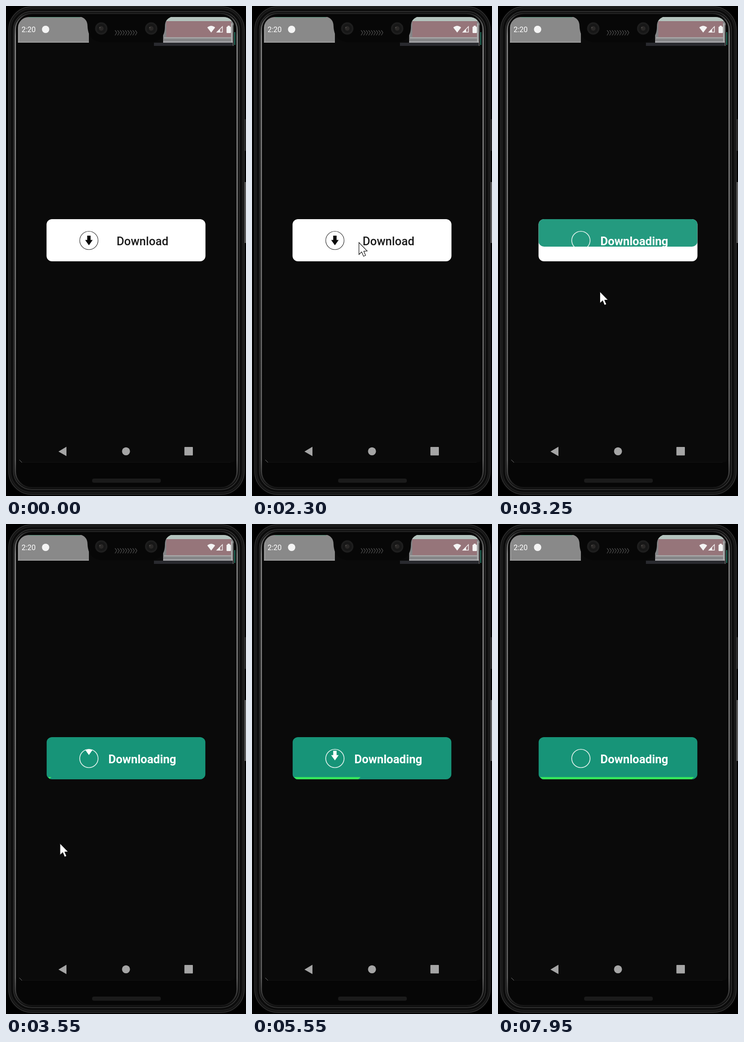
Write an HTML page with a canvas that moves like this. It is 524x1069 px and loops after 8000 ms.

```html
<!DOCTYPE html>
<html lang="en">
<head>
<meta charset="utf-8">
<title>Download button</title>
<style>
  html, body { margin: 0; width: 100%; height: 100%; overflow: hidden; background: #000; }
  canvas { display: block; width: 524px; height: 1069px; }
</style>
</head>
<body>
<canvas id="stage" width="524" height="1069"></canvas>
<script>
const W = 524, H = 1069, LOOP = 8000;
const ctx = document.getElementById('stage').getContext('2d');
const FONT = 'Roboto, "Noto Sans", sans-serif';
const BTN = { x: 88.5, y: 465, w: 347, h: 92, r: 12 };
const RING = { x: 181, y: 511.5, r: 20 };
const PRESS = 3000;

const clamp = v => Math.min(1, Math.max(0, v));
const ease = v => (1 - Math.cos(Math.PI * clamp(v))) / 2;

// Smooth curve through [time, value] keys
function curve(keys, t) {
  const n = keys.length - 1;
  if (t <= keys[0][0]) return keys[0][1];
  if (t >= keys[n][0]) return keys[n][1];
  let i = 0;
  while (t > keys[i + 1][0]) i++;
  const slope = k => {
    if (k === 0 || k === n) return 0;
    const a = (keys[k][1] - keys[k - 1][1]) / (keys[k][0] - keys[k - 1][0]);
    const b = (keys[k + 1][1] - keys[k][1]) / (keys[k + 1][0] - keys[k][0]);
    return a * b <= 0 ? 0 : 2 * a * b / (a + b);
  };
  const [t0, v0] = keys[i], [t1, v1] = keys[i + 1];
  const d = t1 - t0, u = (t - t0) / d, u2 = u * u, u3 = u2 * u;
  return v0 * (2 * u3 - 3 * u2 + 1) + v1 * (3 * u2 - 2 * u3)
    + d * (slope(i) * (u3 - 2 * u2 + u) + slope(i + 1) * (u3 - u2));
}

function roundRect(c, x, y, w, h, r) {
  c.beginPath();
  c.roundRect(x, y, w, h, r);
}
function poly(c, pts) {
  c.beginPath();
  pts.forEach(([x, y]) => c.lineTo(x, y));
  c.closePath();
}
function disc(c, x, y, r, color) {
  c.beginPath();
  c.arc(x, y, r, 0, 7);
  c.fillStyle = color;
  c.fill();
}
function rect(c, x, y, w, h, color) {
  c.fillStyle = color;
  c.fillRect(x, y, w, h);
}
function line(c, x1, y1, x2, y2, color, width = 1) {
  c.beginPath();
  c.moveTo(x1, y1);
  c.lineTo(x2, y2);
  c.strokeStyle = color;
  c.lineWidth = width;
  c.stroke();
}

function drawBody(c) {
  rect(c, 0, 0, W, H, '#000');
  // bright along the sides, fading into the corners
  const shine = c.createLinearGradient(0, 14, 0, 1052);
  [[0, '#1c1c1c'], [0.015, '#484848'], [0.05, '#808080'], [0.5, '#707070'],
    [0.94, '#5c5c5c'], [0.975, '#363636'], [1, '#141414']].forEach(s => shine.addColorStop(...s));
  const frames = [
    [6, 1.5, 514, 1064, 50, '#131313', '#2c2c2c', 2],
    [10, 6, 506, 1055, 46, '#0b0b0b', '#1e1e1e', 2],
    [16.5, 12, 493, 1043, 40, '#0a0a0a', '#303030', 2],
    [20.3, 16, 484.4, 1035, 36, '#060606', shine, 3]
  ];
  for (const [x, y, w, h, r, fill, stroke, lw] of frames) {
    roundRect(c, x, y, w, h, r);
    c.fillStyle = fill;
    c.fill();
    c.strokeStyle = stroke;
    c.lineWidth = lw;
    c.stroke();
  }
  rect(c, 521, 247, 3, 69, '#262626');
  rect(c, 521, 384, 3, 133, '#5a5a5a');

  roundRect(c, 25, 24, 475, 972, [24, 24, 8, 8]);
  c.fillStyle = '#0a0a0a';
  c.fill();
  line(c, 36, 995.5, 490, 995.5, '#141414');
  line(c, 29, 990, 35, 996, '#777');
  roundRect(c, 188, 1031, 150, 9, 4);
  c.fillStyle = '#1b1b1b';
  c.fill();
}

function drawTop(c) {
  c.save();
  roundRect(c, 26, 24, 473, 63, [24, 24, 0, 0]);
  c.clip();
  rect(c, 26, 24, 155, 56, '#898989');
  rect(c, 50, 23, 112, 2.5, '#62927f');
  rect(c, 26, 78, 155, 2, '#a0a0a0');
  line(c, 28.5, 40, 28.5, 79, '#a2a2a2');
  rect(c, 323, 80, 174, 7, '#292a2f');
  rect(c, 343, 24, 154, 56, '#858587');
  rect(c, 349, 24, 143, 9, '#b4c3bd');
  rect(c, 350, 33, 141, 35, '#96757a');
  rect(c, 345, 68, 148, 3, '#a4a4a4');
  rect(c, 343, 77, 154, 3, '#a4a4a7');
  rect(c, 491.5, 38, 2.5, 42, '#b0b0b0');
  rect(c, 495, 42, 2, 45, '#606060');
  c.restore();
  line(c, 499.5, 57, 499.5, 85, '#37a98d', 1.5);

  // notch with flared shoulders
  c.beginPath();
  c.moveTo(158, 22);
  c.bezierCurveTo(172, 25, 178, 32, 178, 44);
  c.bezierCurveTo(179, 67, 190, 79, 213, 79);
  c.lineTo(313, 79);
  c.bezierCurveTo(336, 79, 347, 67, 347, 44);
  c.bezierCurveTo(347, 32, 353, 26, 365, 22);
  c.closePath();
  c.fillStyle = '#070707';
  c.fill();

  for (const x of [208, 317]) {
    disc(c, x, 49, 13.5, '#1e1e1e');
    disc(c, x, 49, 10, '#171717');
    disc(c, x, 49, 5, '#2a2827');
    disc(c, x - 3, 47, 1.5, '#4a4745');
  }
  // speaker grille
  for (let x = 238; x < 287; x += 5.5) {
    line(c, x, 53, x + 4, 58, '#484848', 1.5);
    line(c, x + 4, 58, x, 64, '#404040', 1.5);
  }
}

function drawStatus(c) {
  c.fillStyle = '#fff';
  c.font = '16px ' + FONT;
  c.textAlign = 'left';
  c.fillText('2:20', 34, 57);
  disc(c, 86.5, 51, 8, '#f4f4f4');
  // wifi fan
  c.beginPath();
  c.moveTo(448, 58);
  c.lineTo(439.5, 47);
  c.quadraticCurveTo(448, 39.5, 456.5, 47);
  c.closePath();
  c.fill();
  // signal strength
  poly(c, [[460.5, 57], [472.5, 57], [472.5, 45]]);
  c.strokeStyle = '#f4f0f0';
  c.lineWidth = 1.5;
  c.stroke();
  poly(c, [[460, 57.5], [467.5, 57.5], [467.5, 50]]);
  c.fill();
  // battery
  roundRect(c, 481.5, 45, 9.5, 14, 1.5);
  c.fill();
  c.fillRect(484, 43, 4.5, 3);
}

function drawNav(c) {
  c.fillStyle = '#a5a5a5';
  poly(c, [[114.5, 972], [132, 961.5], [132, 982]]);
  c.fill();
  disc(c, 262, 971.5, 8.7, '#a5a5a5');
  roundRect(c, 389.5, 962, 18.5, 18.5, 1);
  c.fill();
}

const phone = document.createElement('canvas');
phone.width = W;
phone.height = H;
[drawBody, drawTop, drawStatus, drawNav].forEach(draw => draw(phone.getContext('2d')));

function drawRing(color, width) {
  ctx.beginPath();
  ctx.arc(RING.x, RING.y, RING.r, 0, 7);
  ctx.strokeStyle = color;
  ctx.lineWidth = width;
  ctx.stroke();
}

// Down arrow whose point sits at y
function drawArrow(y, color) {
  const x = RING.x;
  poly(ctx, [[x - 3.7, y - 21], [x + 3.7, y - 21], [x + 3.7, y - 11.5],
    [x + 8.2, y - 11.5], [x, y], [x - 8.2, y - 11.5], [x - 3.7, y - 11.5]]);
  ctx.fillStyle = color;
  ctx.fill();
}

function label(text, x, weight, size, color) {
  ctx.font = `${weight} ${size}px ${FONT}`;
  ctx.textAlign = 'center';
  ctx.fillStyle = color;
  ctx.fillText(text, x, 521.5);
}

function drawIdle(t) {
  roundRect(ctx, BTN.x, BTN.y, BTN.w, BTN.h, BTN.r);
  ctx.fillStyle = '#fff';
  ctx.fill();
  ctx.globalAlpha = 1 - clamp((t - PRESS) / 200);
  drawRing('#333', 1.2);
  drawArrow(522, '#0a0a0a');
  label('Download', 298, 500, 25.4, '#1b1b1b');
  ctx.globalAlpha = 1;
}

const BAR = [[3300, 95], [4350, 131], [4700, 154], [5550, 236], [6500, 336], [7950, 427], [8000, 428]];

function drawBusy(t) {
  const shown = BTN.h * ease((t - PRESS) / 420);
  if (shown <= 0) return;
  ctx.save();
  roundRect(ctx, BTN.x, BTN.y, BTN.w, shown, Math.min(BTN.r, shown / 2));
  ctx.clip();
  ctx.globalAlpha = clamp((t - PRESS) / 267);
  rect(ctx, BTN.x, BTN.y, BTN.w, BTN.h, '#179478');
  ctx.globalAlpha = 1;
  drawRing('#e0f1ec', 1.7);
  label('Downloading', 297.5, 700, 25.4, '#fff');

  if (t > 3300) {
    const end = curve(BAR, t);
    poly(ctx, [[92, 552], [end + 1, 552], [end - 4, 557], [96, 557]]);
    ctx.fillStyle = '#35e65c';
    ctx.fill();
  }

  const step = (t - 3240) % 1870;
  if (step >= 0) {
    ctx.beginPath();
    ctx.arc(RING.x, RING.y, RING.r, 0, 7);
    ctx.clip();
    drawArrow(490 + 63 * ease(step / 1000), '#fff');
  }
  ctx.restore();
}

const MOUSE_X = [[0, -40], [50, 6], [300, 120], [700, 204], [1200, 204], [1450, 222], [1650, 234],
  [1850, 234], [2250, 233], [2950, 233], [3250, 222], [3500, 145], [3800, -30]];
const MOUSE_Y = [[0, 640], [300, 676], [700, 689], [1200, 689], [1450, 704], [1650, 694], [1850, 694],
  [2250, 516], [2450, 515], [2950, 515], [3250, 622], [3550, 696], [3800, 700]];

function drawMouse(t) {
  const x = curve(MOUSE_X, t), y = curve(MOUSE_Y, t);
  if (x < -25) return;
  ctx.save();
  ctx.translate(x, y);
  poly(ctx, [[0.5, 0.5], [0.5, 26.5], [6.5, 21], [10.5, 30.5], [15, 28.5], [11, 19.5], [18.5, 19]]);
  ctx.fillStyle = '#fff';
  ctx.fill();
  ctx.strokeStyle = '#111';
  ctx.lineWidth = 1.2;
  ctx.stroke();
  ctx.restore();
}

const start = performance.now();

function frame(now) {
  const t = Math.max(0, now - start) % LOOP;
  ctx.drawImage(phone, 0, 0);
  if (t < PRESS + 420) drawIdle(t);
  drawBusy(t);
  drawMouse(t);
  requestAnimationFrame(frame);
}
frame(start);
</script>
</body>
</html>
```
